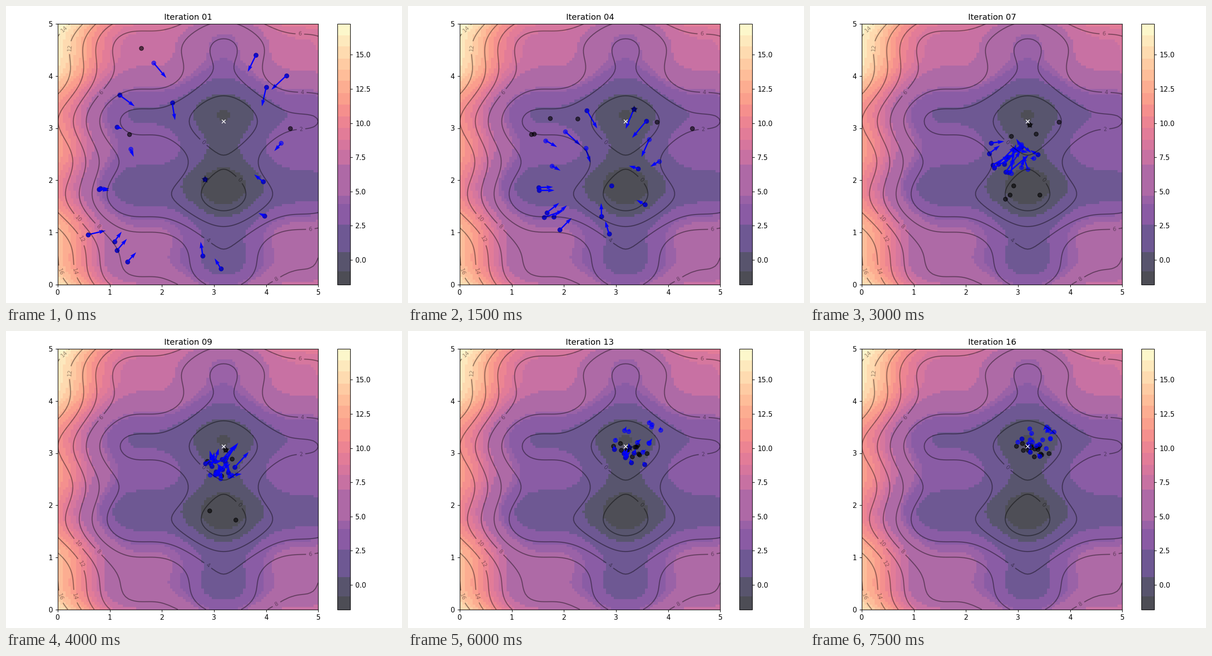
These frames come from a looping animation (864 px wide and 648 px high, 8000 ms). A matplotlib script:

```python
import numpy as np
import matplotlib.pyplot as plt
from matplotlib.animation import FuncAnimation
from matplotlib.colors import ListedColormap

W, C1, C2 = 0.8, 0.1, 0.1
N_PARTICLES, N_ITER = 20, 16
STAGE_W, STAGE_H = 864, 648


def f(x, y):
    return ((x - 3.14)**2 + (y - 2.72)**2
            + np.sin(3*x + 1.41) + np.sin(4*y - 1.73))


def run_swarm():
    """Return (position, velocity, personal best, global best) per iteration."""
    rng = np.random.RandomState(100)
    pos = rng.rand(2, N_PARTICLES) * 5
    vel = rng.randn(2, N_PARTICLES) * 0.1
    best, best_obj = pos.copy(), f(*pos)
    top = best[:, [best_obj.argmin()]]
    states = []
    for _ in range(N_ITER + 1):
        r1, r2 = rng.rand(2)
        vel = W*vel + C1*r1*(best - pos) + C2*r2*(top - pos)
        pos = pos + vel
        obj = f(*pos)
        best = np.where(best_obj >= obj, pos, best)
        best_obj = np.minimum(best_obj, obj)
        top = best[:, [best_obj.argmin()]]
        states.append((pos, vel, best, top))
    return states[1:]  # one warm-up step


def banded(name, edges):
    """Colormap with flat bands between the given values."""
    lo, hi = edges[0], edges[-1]
    mids = ((edges[:-1] + edges[1:]) / 2 - lo) / (hi - lo)
    vals = lo + (np.arange(256) + 0.5) / 256 * (hi - lo)
    band = np.searchsorted(edges, vals) - 1
    return ListedColormap(plt.get_cmap(name)(mids[band]))


def place(axes, left, top, width, height):
    """Put axes at a pixel box measured from the top left."""
    axes.set_position([left / STAGE_W, 1 - (top + height) / STAGE_H,
                       width / STAGE_W, height / STAGE_H])


grid = np.linspace(0, 5, 100)
x, y = np.meshgrid(grid, grid)
z = f(x, y)
x_min, y_min = x.ravel()[z.argmin()], y.ravel()[z.argmin()]
edges = np.concatenate([
    [z.min(), -0.85, 0.6, 2.6, 4.1, 4.7, 6.95, 8.0],
    np.arange(8.8, 16.9, 0.85), [z.max()]])

states = run_swarm()
pos, vel, best, top = states[0]

fig, ax = plt.subplots(figsize=(STAGE_W / 108, STAGE_H / 108), dpi=108)
img = ax.imshow(z, extent=[0, 5, 0, 5], cmap=banded("magma", edges), alpha=0.7)
bar = fig.colorbar(img, ax=ax)
ax.plot([x_min], [y_min], marker="x", markersize=5, color="white")
contours = ax.contour(x, y, z, 10, colors="black", alpha=0.4)
ax.clabel(contours, inline=True, fontsize=8, fmt="%.0f")
best_dots = ax.scatter(*best, marker="o", color="black", alpha=0.6)
dots = ax.scatter(*pos, marker="o", color="blue", alpha=0.6)
arrows = ax.quiver(*pos, *vel, color="blue", width=0.005,
                   angles="xy", scale_units="xy", scale=1)
star = ax.scatter(*top, marker="*", s=100, color="black", alpha=0.4)
ax.set_xlim(0, 5)
ax.set_ylim(0, 5)

# Labels are laid out first, then the axes get their final boxes.
SIDE = 568.5
place(ax, 112.8, 39.1, SIDE, SIDE)
place(bar.ax, 723, 39.1, SIDE / 20, SIDE)


def animate(i):
    pos, vel, best, top = states[i]
    ax.set_title(f"Iteration {i + 1:02d}")
    best_dots.set_offsets(best.T)
    dots.set_offsets(pos.T)
    arrows.set_offsets(pos.T)
    arrows.set_UVC(*vel)
    star.set_offsets(top.T)
    return best_dots, dots, arrows, star


anim = FuncAnimation(fig, animate, frames=N_ITER, interval=500,
                     blit=False, repeat=True, repeat_delay=0)
plt.show()
```
